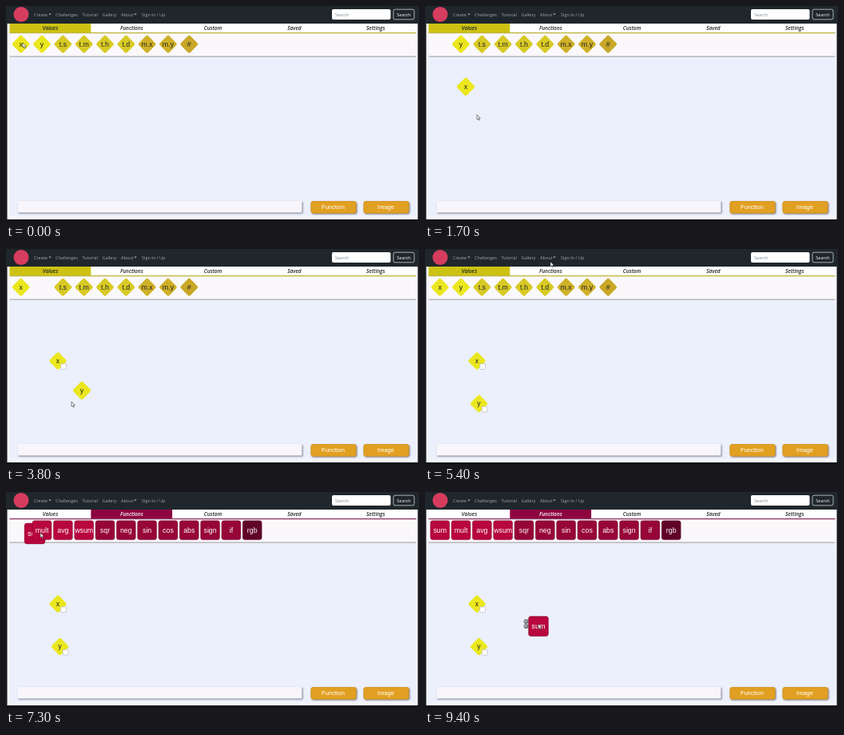
Recreate the animation shown at these times as an HTML page with a canvas. Size 517 by 269 pixels, loop 9500 ms.

```html
<!DOCTYPE html>
<html>
<head>
<meta charset="utf-8">
<style>
html, body { margin: 0; width: 100%; height: 100%; overflow: hidden; background: #111; }
canvas { display: block; }
</style>
</head>
<body>
<canvas id="stage" width="517" height="269"></canvas>
<script>
const ctx = document.getElementById('stage').getContext('2d');
const SANS = '"Open Sans", sans-serif', ARIAL = '"Liberation Sans", Arial, sans-serif';
const LOOP = 9500, LAG = 150;

// time, x, y of the pointer tip
const path = [
  [0, 21, 46], [1000, 21, 46], [1550, 51, 98], [1700, 65, 136], [2200, 65, 137],
  [2800, 46, 45], [3000, 46, 45], [3400, 88, 120], [3650, 95, 174], [3800, 82, 191],
  [3950, 67, 190], [4500, 67, 190], [5400, 157, 16], [5600, 157, 24], [5900, 157, 24],
  [6600, 21, 46], [6900, 21, 46], [7150, 36, 49], [7300, 43, 51], [7850, 143, 165],
  [8000, 141, 168], [8300, 142, 165], [9500, 142, 165]
];
const drags = [
  { name: 'x', from: 1000, to: 2200, x: 65, y: 140 },
  { name: 'y', from: 3000, to: 4300, x: 67.5, y: 193.5 },
  { name: 'sum', from: 6900, to: 8400, x: 142, y: 168 }
];
const yellow = ['#ebe71e', '#d8ca24', '#cfb128', '#c9a727'];
const red = ['#b8063f', '#970638', '#600427'];
const values = ['x', 'y', 't.s', 't.m', 't.h', 't.d', 'm.x', 'm.y', '#']
  .map((name, i) => ({ name, diamond: true, fill: yellow[i < 2 ? 0 : i < 6 ? 1 : i < 8 ? 2 : 3] }));
const functions = ['sum', 'mult', 'avg', 'wsum', 'sqr', 'neg', 'sin', 'cos', 'abs', 'sign', 'if', 'rgb']
  .map((name, i) => ({ name, fill: red[i < 4 ? 0 : i < 11 ? 1 : 2] }));
const tiles = [...values, ...functions];

function pointer(t) {
  const i = Math.max(1, path.findIndex(p => p[0] >= t));
  const [a, b] = [path[i - 1], path[i]];
  const k = (t - a[0]) / (b[0] - a[0]);
  return [a[1] + (b[1] - a[1]) * k, a[2] + (b[2] - a[2]) * k];
}

function rect(x, y, w, h, fill, r = 0, stroke) {
  ctx.beginPath();
  ctx.roundRect(x, y, w, h, r);
  ctx.fillStyle = fill;
  ctx.fill();
  if (stroke) { ctx.strokeStyle = stroke; ctx.lineWidth = 0.7; ctx.stroke(); }
}

function circle(x, y, r, fill) {
  ctx.beginPath();
  ctx.arc(x, y, r, 0, 7);
  ctx.fillStyle = fill;
  ctx.fill();
}

function text(s, x, y, font, fill, align = 'center') {
  ctx.font = font;
  ctx.fillStyle = fill;
  ctx.textAlign = align;
  ctx.fillText(s, x, y);
}

function shadowed(draw) {
  ctx.save();
  ctx.shadowColor = 'rgba(60,55,70,.65)';
  ctx.shadowBlur = 2;
  ctx.shadowOffsetX = ctx.shadowOffsetY = 1;
  draw();
  ctx.restore();
}

function tile({ name, diamond, fill }, x, y, scale = 1) {
  ctx.save();
  ctx.translate(x, y);
  ctx.scale(scale, scale);
  ctx.save();
  if (diamond) {
    ctx.rotate(Math.PI / 4);
    rect(-8.3, -8.3, 16.6, 16.6, fill, 2.2);
  } else {
    rect(-12, -12, 24, 24, fill, 3, 'rgba(90,0,40,.45)');
  }
  ctx.restore();
  text(name, 0, 3, '8.8px ' + ARIAL, diamond ? '#222' : '#fff');
  ctx.restore();
}

function nav() {
  rect(0, 0, 517, 22, '#1f272c');
  circle(19, 10.5, 9.5, '#d63c5e');
  const items = [['Create', 35, 55], ['Challenges', 62], ['Tutorial', 95.5],
    ['Gallery', 120.5], ['About', 144, 162], ['Sign In / Up', 170]];
  for (const [label, x, caret] of items) {
    text(label, x, 12.5, '5.5px ' + SANS, '#a3a8ab', 'left');
    if (!caret) continue;
    ctx.beginPath();
    ctx.moveTo(caret - 1.7, 9.6);
    ctx.lineTo(caret + 1.7, 9.6);
    ctx.lineTo(caret, 11.4);
    ctx.fill();
  }
  rect(408, 4, 73.5, 13, '#fff', 2);
  text('Search', 412, 12.5, '5.5px ' + SANS, '#858a90', 'left');
  rect(485, 4.2, 26, 12.6, '#1f272c', 2, '#e8e8e8');
  text('Search', 498, 12.5, '5.5px ' + SANS, '#fff');
}

function tabs(active) {
  const color = ['#cdc213', '#8d0540'][active];
  rect(4.5, 22, 509, 11, '#fff');
  rect(4.5 + active * 101.8, 22, 101.8, 11.5, color);
  rect(4.5, 33, 509, 1.6, ['#bdb43a', '#8b3463'][active]);
  ['Values', 'Functions', 'Custom', 'Saved', 'Settings'].forEach((label, i) =>
    text(label, 55.5 + i * 101.8, 29.5, 'italic 600 6.5px ' + SANS,
      active && i === active ? '#fff' : '#222'));
}

function button(label, x) {
  shadowed(() => rect(x, 244, 57, 15.5, '#e2a022', 3));
  rect(x + 0.6, 244.6, 55.8, 14.3, '#e2a022', 3, '#d3952c');
  text(label, x + 28, 254, '7.5px ' + ARIAL, '#fff');
}

function placed({ name, x, y }) {
  const item = tiles.find(v => v.name === name);
  if (item.diamond) {
    tile(item, x, y, 0.98);
    rect(x + 3.7, y + 3.7, 6.8, 6.8, '#fff', 0.8, '#b9b9bd');
  } else {
    for (const dy of [-6, 0]) {
      circle(x - 15.5, y + dy, 3, '#77777c');
      circle(x - 16, y + dy - 0.5, 1.7, '#a5a5aa');
    }
    tile(item, x, y, 1.04);
  }
}

function arrow(x, y) {
  ctx.beginPath();
  [[0, 0], [0, 6], [1.4, 4.8], [2.4, 7], [3.4, 6.5], [2.5, 4.4], [4.3, 4.3]]
    .forEach(([dx, dy]) => ctx.lineTo(x + dx, y + dy));
  ctx.closePath();
  ctx.fillStyle = '#fff';
  ctx.fill();
  ctx.strokeStyle = '#333';
  ctx.lineWidth = 0.6;
  ctx.stroke();
}

function draw(t) {
  const active = t >= 5700 ? 1 : 0;
  const held = drags.find(d => t > d.from && t < d.to);
  rect(0, 0, 517, 269, '#15161a');
  rect(1.5, 22, 514, 245, '#f5f6fb');
  nav();
  tabs(active);
  rect(4.5, 34.6, 509, 28.4, '#faf8fa');
  rect(4.5, 62.6, 509, 1.4, '#b9b8bb');
  rect(4.5, 64, 509, 198.5, '#ebf0fc');
  shadowed(() => rect(14.5, 244, 356, 14.5, '#f8f6fa', 1));
  button('Function', 381.5);
  button('Image', 447.5);

  drags.filter(d => t >= d.to).forEach(placed);
  if (held) {
    const [x, y] = pointer(Math.max(held.from, t - LAG));
    tile(tiles.find(v => v.name === held.name), x, y + 3, held.name === 'sum' ? 1.08 : 1.03);
  }
  (active ? functions : values).forEach((item, i) => {
    if (!held || held.name !== item.name) tile(item, 18.7 + i * 26.32, 47.8);
  });
  arrow(...pointer(t));
}

function frame(now) {
  draw(Math.floor(now % LOOP / 100) * 100);
  requestAnimationFrame(frame);
}
requestAnimationFrame(frame);
</script>
</body>
</html>
```
